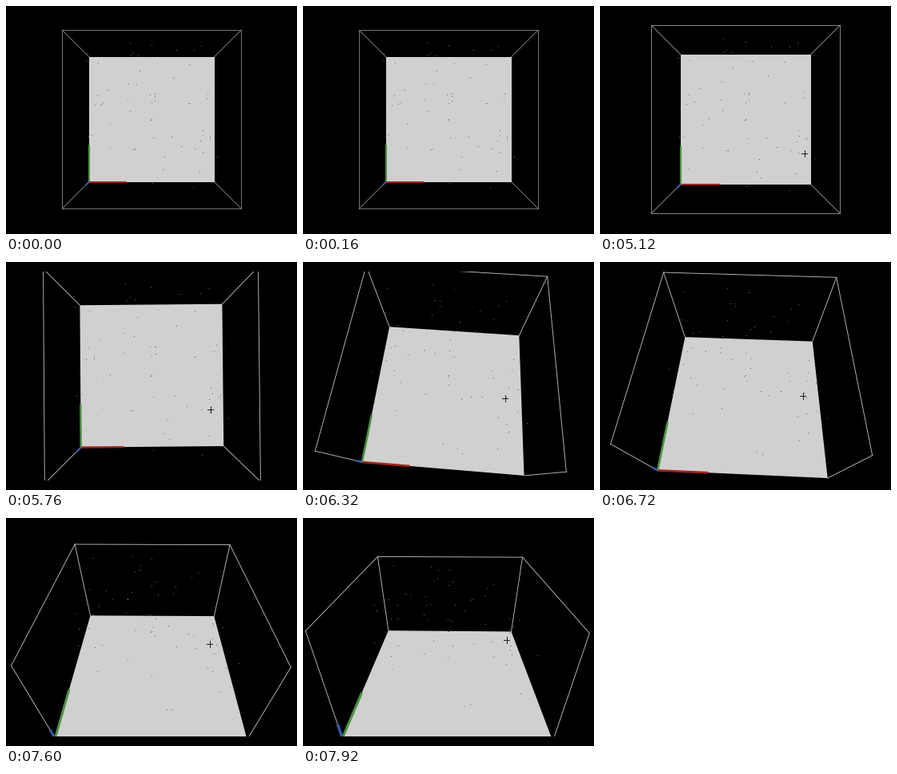
Animation of 364 by 286 pixels, one loop 8000 ms. Source, as a matplotlib script:

```python
import numpy as np
import matplotlib.pyplot as plt
from matplotlib.animation import FuncAnimation

W, H = 364, 286
TOP, BOTTOM = 12, 274          # visible band of the viewport
CX, CY, FOCAL = 182.2, 142.2, 316
STEP, COUNT = 80, 100
HALF, TALL = 0.5, 0.3          # half width and half height of the box
FAR, NEAR = 1.713, 1.4725      # camera distance before and after the zoom
PX = 0.72                      # one pixel in points

# Key poses of the drag: time in ms, then degrees of tilt and turn.
KEY_TIMES = [5200, 5760, 6000, 6320, 7200, 7760, 7920]
KEY_TILT = [0, 0.3, 12.5, 23, 38, 50, 58.8]
KEY_TURN = [0, -0.5, 0, 4.5, 0, 0.6, 0.9]


def camera(t):
    """Distance, tilt and turn (radians) at time t in ms."""
    dist = np.interp(t, [4240, 5120, 5680], [FAR, 1.639, NEAR])
    tilt = np.radians(np.interp(t, KEY_TIMES, KEY_TILT))
    turn = np.radians(np.interp(t, KEY_TIMES, KEY_TURN))
    return dist, tilt, turn


def project(points, cam):
    """Screen positions and depths of points in box space."""
    dist, tilt, turn = cam
    x, y, z = np.asarray(points, float).T
    across = x * np.cos(turn) + y * np.sin(turn)
    away = y * np.cos(turn) - x * np.sin(turn)
    up = away * np.cos(tilt) + z * np.sin(tilt)
    depth = dist + away * np.sin(tilt) - z * np.cos(tilt)
    screen = np.column_stack([CX + FOCAL * across / depth, CY - FOCAL * up / depth])
    return screen, depth


CORNERS = [(-HALF, -HALF), (HALF, -HALF), (HALF, HALF), (-HALF, HALF)]
FLOOR = [(x, y, -TALL) for x, y in CORNERS]
ROOF = [(x, y, TALL) for x, y in CORNERS]
EDGES = [(ROOF[i], ROOF[(i + 1) % 4]) for i in range(4)] + list(zip(FLOOR, ROOF))
ORIGIN = np.array(FLOOR[0])
AXES = [((0.3, 0, 0), "#a02420"), ((0, 0.3, 0), "#4c9440"), ((0, 0, 0.1), "#3459a4")]

rng = np.random.default_rng(4)
size = np.array([HALF, HALF, TALL])
particles = rng.uniform(-size, size, (60, 3)) * 0.95
particles[0] = 0               # one particle marks the orbit centre
tints = rng.uniform(0.32, 0.5, (60, 3))

fig = plt.figure(figsize=(W / 100, H / 100), dpi=100, facecolor="black")
ax = fig.add_axes([0, (H - BOTTOM) / H, 1, (BOTTOM - TOP) / H])
ax.set_position([0, (H - BOTTOM) / H, 1, (BOTTOM - TOP) / H])
ax.set_xlim(0, W)
ax.set_ylim(BOTTOM, TOP)
ax.axis("off")

edge_lines = [ax.plot([], [], lw=0.9 * PX, zorder=1)[0] for _ in EDGES]
floor = plt.Polygon(np.zeros((4, 2)), fc="#d0d0d0", ec="none", zorder=2)
ax.add_patch(floor)
axis_lines = [ax.plot([], [], color=c, solid_capstyle="butt", zorder=3)[0] for _, c in AXES]
dots = ax.scatter(*particles[:, :2].T, s=0.5, marker="s", c=tints,
                  edgecolors="none", linewidths=0, zorder=4)
cross = [ax.plot([], [], color="#202020", lw=PX, zorder=5)[0] for _ in range(2)]


def draw_edges(cam):
    dist, tilt, _ = cam
    # Thin lines look brighter as the camera comes closer.
    gray = np.interp(dist, [NEAR, FAR], [0.74, 0.5])
    for line, ends in zip(edge_lines, EDGES):
        line.set_data(*project(ends, cam)[0].T)
        line.set_color(str(gray))
    # The front roof edge shows only while the front wall is seen from inside.
    edge_lines[0].set_visible(dist * np.sin(tilt) < HALF)


def draw_axes(cam):
    for line, (arm, _) in zip(axis_lines, AXES):
        ends, depth = project([ORIGIN, ORIGIN + arm], cam)
        line.set_data(*ends.T)
        line.set_linewidth(0.013 * FOCAL / depth.mean() * PX)


def draw_cursor(t):
    times = [5760, 6320, 7200, 7920]
    x = round(np.interp(t, times, [255, 252, 254, 254])) + 0.5
    y = round(np.interp(t, times, [184, 170, 163, 152])) + 0.5
    cross[0].set_data([x - 3.5, x + 3.5], [y, y])
    cross[1].set_data([x, x], [y - 4, y + 4])
    for line in cross:
        line.set_visible(t >= 4320)


def draw(frame):
    t = frame * STEP
    cam = camera(t)
    draw_edges(cam)
    floor.set_xy(project(FLOOR, cam)[0])
    draw_axes(cam)
    dots.set_offsets(project(particles, cam)[0])
    draw_cursor(t)
    return []


anim = FuncAnimation(fig, draw, frames=COUNT, interval=STEP, repeat=True, repeat_delay=0)
plt.show()
```
